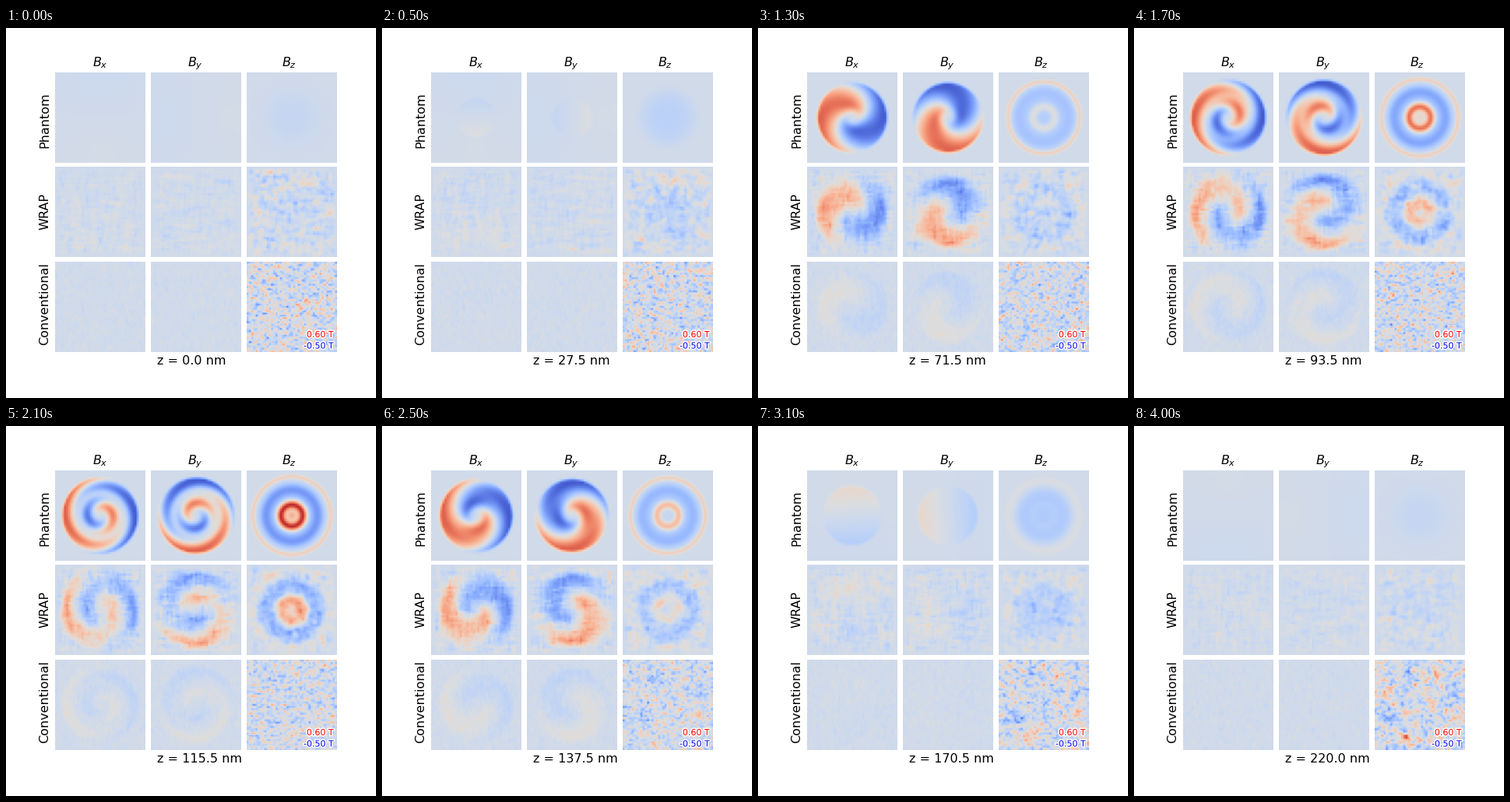
A matplotlib script that plays this animation: 475x475 px, repeating every 4.1 s.

```python
import numpy as np
import matplotlib.pyplot as plt
import matplotlib.patheffects as pe
from matplotlib.animation import FuncAnimation

N = 41            # cells per axis, one slice per frame
STAGE = 475
STEP_NM = 5.5
RADIUS = 17.7     # sphere radius in cells
rng = np.random.default_rng(7)

zz, xx, yy = np.meshgrid(*[np.arange(N) - 20.0] * 3, indexing="ij")
rho = np.hypot(xx, yy)
depth = np.abs(zz)
side = np.where(zz < 0, -1.0, 1.0)


def bell(v, width):
    return np.exp(-(v / width) ** 2)


def sigmoid(v):
    return 1 / (1 + np.exp(-v))


def box(a, sizes):
    """Moving average with one window length per axis."""
    for axis, n in enumerate(sizes):
        a = sum(np.roll(a, i, axis) for i in range(-(n // 2), n - n // 2)) / n
    return a


def noise(*windows, power=1):
    """Sum of box-filtered random fields, each scaled to unit spread."""
    total = 0
    for sizes in windows:
        part = box(rng.normal(size=(N + 9, N, N)) ** power, sizes)[:N]
        total = total + part / part.std()
    return total / total.std()


def phantom():
    edge = np.sqrt(np.maximum(RADIUS ** 2 - zz ** 2, 0))
    core = sigmoid((8.8 - depth) / 0.5)
    inside = np.clip((edge + 0.3 - rho) / 1.5, 0, 1)

    # spiral of the in-plane field, tighter towards the middle slice
    turn = np.radians(np.maximum(20 - 1.6 * depth, 0))
    phase = side * turn * (edge - 1.8 - rho)
    amp = 0.47 * core * inside * np.tanh((rho / 4.5) ** 2)
    amp *= 1 - 0.9 * bell(rho - 10, 3) * bell(zz, 4)
    around = amp * np.cos(phase)
    outward = amp * np.sin(phase)
    stray = 0.1 * bell(depth - 11, 4) * inside * rho / np.maximum(edge, 6)
    far = 0.012 * np.minimum(rho / 12, 1) * sigmoid(depth - 10)
    outward = outward - side * (stray + far)
    r = np.maximum(rho, 1e-6)
    bx = (xx * outward - yy * around) / r
    by = (yy * outward + xx * around) / r

    over = np.maximum(depth - 11, 0)
    rim = 12.1 - 0.35 * over + 2 * core
    disc = -0.115 * np.exp(-over / 10) * sigmoid((rim - rho) / (1 + 0.25 * over))
    ring = (0.12 * core + 0.035 * np.exp(-over / 3)) * bell(
        rho - np.maximum(edge, 16), 2 - core)
    bz = disc + ring
    bz += 0.7 * bell(zz, 5.8) * bell(rho - 4.9, 2.0)
    bz += 0.42 * bell(zz, 4) * bell(rho, 2.5)
    bz -= 0.2 * bell(zz, 5.5) * bell(rho - 11.8, 2.8)
    return [bx, by, bz]


def wrap(fields):
    bx, by, bz = fields
    border = np.minimum(20.5 - np.abs(xx), 20.5 - np.abs(yy))
    fade = np.clip(border / 3, 0.2, 1)
    level = 0.02 + 0.022 * bell(zz, 14)
    streaks = [(3, 9, 2), (3, 3, 1), (3, 1, 6)]
    flipped = [(a, c, b) for a, b, c in streaks]
    patches = [(3, 5, 2), (3, 2, 5), (3, 2, 2)]
    return [
        0.75 * box(bx, (3, 9, 3)) + level * fade * noise(*streaks, power=3),
        0.75 * box(by, (3, 3, 9)) + level * fade * noise(*flipped, power=3),
        0.75 * box(bz, (3, 5, 5))
        + (0.046 - 0.0006 * zz) * fade * noise(*patches, power=3),
    ]


def conventional(fields):
    bx, by, _ = fields
    late = np.clip((zz + 5) / 20, 0, 1)
    blobs = 0
    for row, col, sign in [(14, 6, 1), (6, 27, 1), (25, 36, 1), (35, 14, 1),
                           (6, 14, -1), (15, 35, -1), (26, 7, -1)]:
        blobs = blobs + sign * bell(np.hypot(xx + 20 - row, yy + 20 - col), 2.6)
    grain = noise((3, 1, 1), (3, 1, 2))
    coarse = noise((7, 2, 2))
    return [
        0.13 * box(bx, (3, 3, 3)) + 0.012 * noise((1, 2, 1)),
        0.13 * box(by, (3, 3, 3)) + 0.012 * noise((1, 2, 1)),
        0.115 * (1 - 0.4 * late) * grain + late * (0.08 * coarse + 0.2 * blobs),
    ]


truth = phantom()
rows = [truth, wrap(truth), conventional(truth)]

fig = plt.figure(figsize=(STAGE / 100, STAGE / 100), dpi=100, facecolor="white")


def label(x, y, text, size=16, **kw):
    """Text at a pixel position measured from the top left."""
    return fig.text(x / STAGE, 1 - y / STAGE, text, fontsize=size * 0.72,
                    family="DejaVu Sans", **kw)


images = []
for i, fields in enumerate(rows):
    for j, field in enumerate(fields):
        left, top = 63 + 123 * j, 57 + 243 * i // 2
        ax = fig.add_axes([left / STAGE, 1 - (top + 116) / STAGE,
                           116 / STAGE, 116 / STAGE])
        ax.axis("off")
        im = ax.imshow(field[0], cmap="coolwarm", vmin=-0.5, vmax=0.6)
        images.append((im, field))

for j, axis in enumerate("xyz"):
    label(121 + 121.5 * j, 49, f"$B_{axis}$", ha="center", va="baseline")
for y, name in [(118.5, "Phantom"), (235.5, "WRAP"), (354.5, "Conventional")]:
    label(54, y, name, rotation=90, rotation_mode="anchor",
          ha="center", va="baseline")
halo = [pe.withStroke(linewidth=2.2, foreground="white")]
for y, text, color in [(397, "0.60 T", "red"), (411.5, "-0.50 T", "blue")]:
    label(420.5, y, text, 11, color=color, ha="right", va="baseline",
          path_effects=halo)
height = label(194.5, 432, "", ha="left", va="baseline")


def update(k):
    for im, field in images:
        im.set_data(field[k])
    height.set_text(f"z = {k * STEP_NM:.1f} nm")
    return [im for im, _ in images] + [height]


anim = FuncAnimation(fig, update, frames=N, interval=100, repeat=True,
                     repeat_delay=0, blit=False)
plt.show()
```
